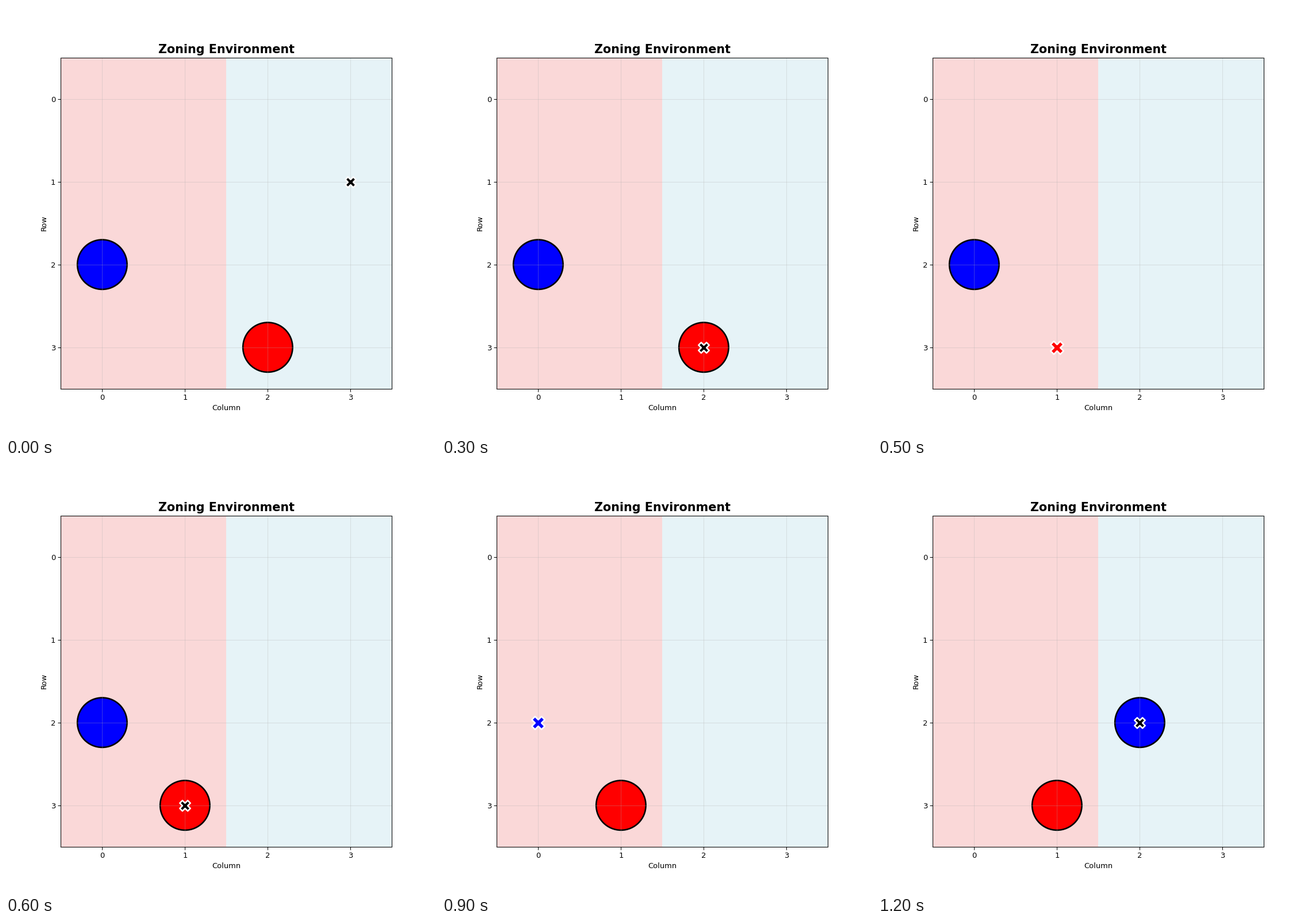
Recreate the animation shown at these times as a matplotlib script. Size 748 by 748 pixels, loop 1.3 s.

```python
import matplotlib.pyplot as plt
from matplotlib.animation import FuncAnimation
from matplotlib.patches import Circle, Rectangle

N = 4
START = (3, 1)
# one action per tick: moves, pick up, drop, or stay
ACTIONS = ["stay", "down", "down", "left", "pick", "left", "drop",
           "up", "left", "pick", "right", "right", "drop"]
MOVES = {"up": (0, -1), "down": (0, 1), "left": (-1, 0), "right": (1, 0)}
SHAPES = {"red": (2, 3), "blue": (0, 2)}


def simulate(step):
    """Agent cell, carried colour and resting shapes after `step`."""
    (x, y), held, resting = START, None, dict(SHAPES)
    for action in ACTIONS[:step + 1]:
        if action in MOVES:
            dx, dy = MOVES[action]
            x, y = x + dx, y + dy
        elif action == "pick":
            held = next(c for c, cell in resting.items() if cell == (x, y))
            del resting[held]
        elif action == "drop":
            resting[held] = (x, y)
            held = None
    return (x, y), held, resting


fig, ax = plt.subplots(figsize=(8, 8), dpi=93.5)
ax.set(xlim=(-0.5, N - 0.5), ylim=(N - 0.5, -0.5), aspect="equal",
       xticks=range(N), yticks=range(N), xlabel="Column", ylabel="Row")
ax.set_title("Zoning Environment", fontsize=16, fontweight="bold")
ax.grid(True, alpha=0.3)

for left, color in ((-0.5, "lightcoral"), (1.5, "lightblue")):
    ax.add_patch(Rectangle((left, -0.5), 2, N, fc=color, ec="none", alpha=0.3))

discs = {c: ax.add_patch(Circle(cell, 0.3, fc=c, ec="black", lw=2))
         for c, cell in SHAPES.items()}
agent = ax.scatter(*START, marker="X", s=200, c="black",
                   edgecolors="white", linewidths=2, zorder=10)


def update(step):
    cell, held, resting = simulate(step)
    for color, disc in discs.items():
        disc.set_visible(color in resting)
        if color in resting:
            disc.center = resting[color]
    agent.set_offsets([cell])
    agent.set_facecolor(held or "black")
    agent.set_sizes([300 if held else 200])
    return [*discs.values(), agent]


anim = FuncAnimation(fig, update, frames=len(ACTIONS), interval=100,
                     repeat=True, repeat_delay=0)
plt.show()
```
